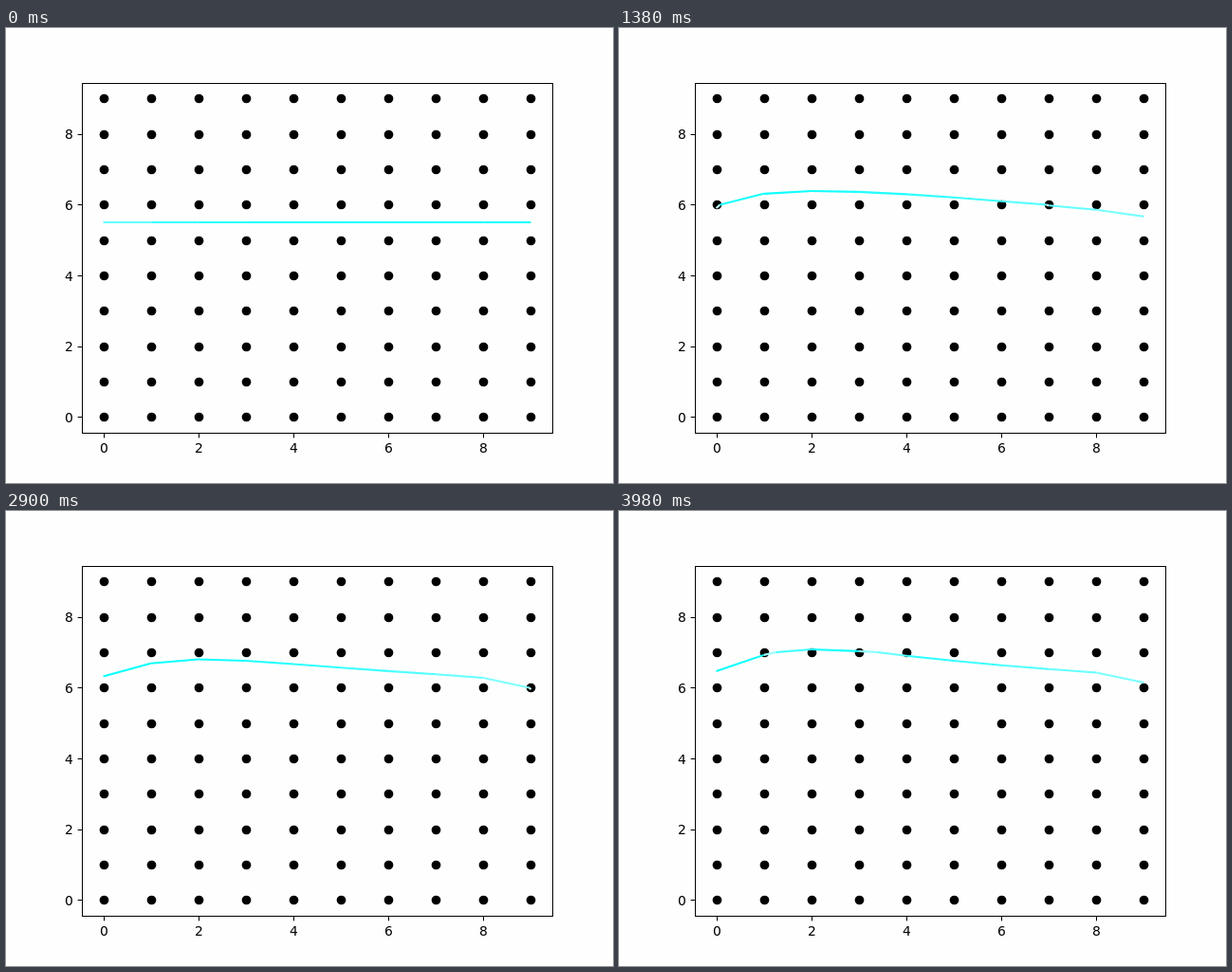
Animation, 640 px wide and 480 px high, one loop 4000 ms. Source, as an HTML page with a canvas:

```html
<!DOCTYPE html>
<html>
<head>
<meta charset="utf-8">
<style>
  html, body { margin: 0; width: 100%; height: 100%; overflow: hidden; background: #fefefe; }
  canvas { display: block; }
</style>
</head>
<body>
<canvas id="stage" width="640" height="480"></canvas>
<script>
const ctx = document.getElementById('stage').getContext('2d');
const LOOP = 4000, STEP = 20;
const px = x => 102.545 + x * 50.101;
const py = y => 410.4 - y * 37.333;
const snap = v => Math.round(v) + 0.5;

// Growth rate per column: decays to the right and is held back at both walls.
const rate = i => 1.95 * Math.exp(-0.2 * i)
  * Math.tanh(0.22 + 0.39 * i ** 1.1)
  * (1 - 0.32 * 0.05 ** (9 - i));

// Every column follows the same filling curve at its own pace.
function frontHeight(i, t) {
  const age = rate(i) * t / 1000;
  const level = 0.52 * (1 - Math.exp(-2.6 * age ** 1.35)) + 0.128 * age;
  return level < 0.5 ? 5 + 0.5 / (1 - level) : 5 + 2 * level;
}

// 0 is cyan, 1 is white.
function tint(i, t) {
  const start = 0.38 * Math.exp(-i / 2.2);
  const later = 0.03 + 0.45 * (i / 8) ** 1.6;
  return start + (later - start) * Math.min(1, t / 200);
}

function line(xa, ya, xb, yb) {
  ctx.beginPath();
  ctx.moveTo(xa, ya);
  ctx.lineTo(xb, yb);
  ctx.stroke();
}

function piece(xa, ya, xb, yb, white) {
  ctx.strokeStyle = `rgb(${Math.round(255 * white)},255,255)`;
  line(px(xa), py(ya), px(xb), py(yb));
}

function drawFront(t) {
  ctx.lineWidth = 2.08;
  for (let i = 0; i < 9; i++) {
    const ya = frontHeight(i, t), yb = frontHeight(i + 1, t), white = tint(i, t);
    const top = Math.max(ya, yb), low = Math.min(ya, yb), row = Math.floor(top);
    if (low >= row) {
      piece(i, ya, i + 1, yb, white);
      continue;
    }
    // Crossing a grid row splits the segment; shorter pieces are paler.
    const part = 1 - (1 - (top - row) / (top - low)) ** 1.8;
    const cut = ya > yb ? part : 1 - part;
    const pale = size => 1 - (1 - white) * (0.2 + 0.8 * size);
    piece(i, ya, i + cut, row, pale(cut));
    piece(i + cut, row, i + 1, yb, pale(1 - cut));
  }
}

function drawDots() {
  ctx.fillStyle = '#fefefe';
  ctx.fillRect(0, 0, 640, 480);
  ctx.fillStyle = '#000';
  for (let x = 0; x < 10; x++) {
    for (let y = 0; y < 10; y++) {
      ctx.beginPath();
      ctx.arc(snap(px(x)), snap(py(y)), 4.86, 0, 2 * Math.PI);
      ctx.fill();
    }
  }
}

function drawAxes() {
  ctx.strokeStyle = '#000';
  ctx.lineWidth = 1;
  ctx.strokeRect(80.5, 58.5, 496, 369);
  ctx.font = '13.89px "DejaVu Sans", sans-serif';
  for (let n = 0; n < 10; n += 2) {
    const x = snap(px(n)), y = snap(py(n));
    line(x, 427.5, x, 432.4);
    line(80.5, y, 75.6, y);
    ctx.fillText(n, Math.ceil(px(n) - 4.42), 448);
    ctx.fillText(n, 62, Math.round(py(n) + 5.45));
  }
}

function frame() {
  const t = Math.floor(performance.now() % LOOP / STEP) * STEP;
  drawDots();
  drawFront(t);
  drawAxes();
  requestAnimationFrame(frame);
}
frame();
</script>
</body>
</html>
```
